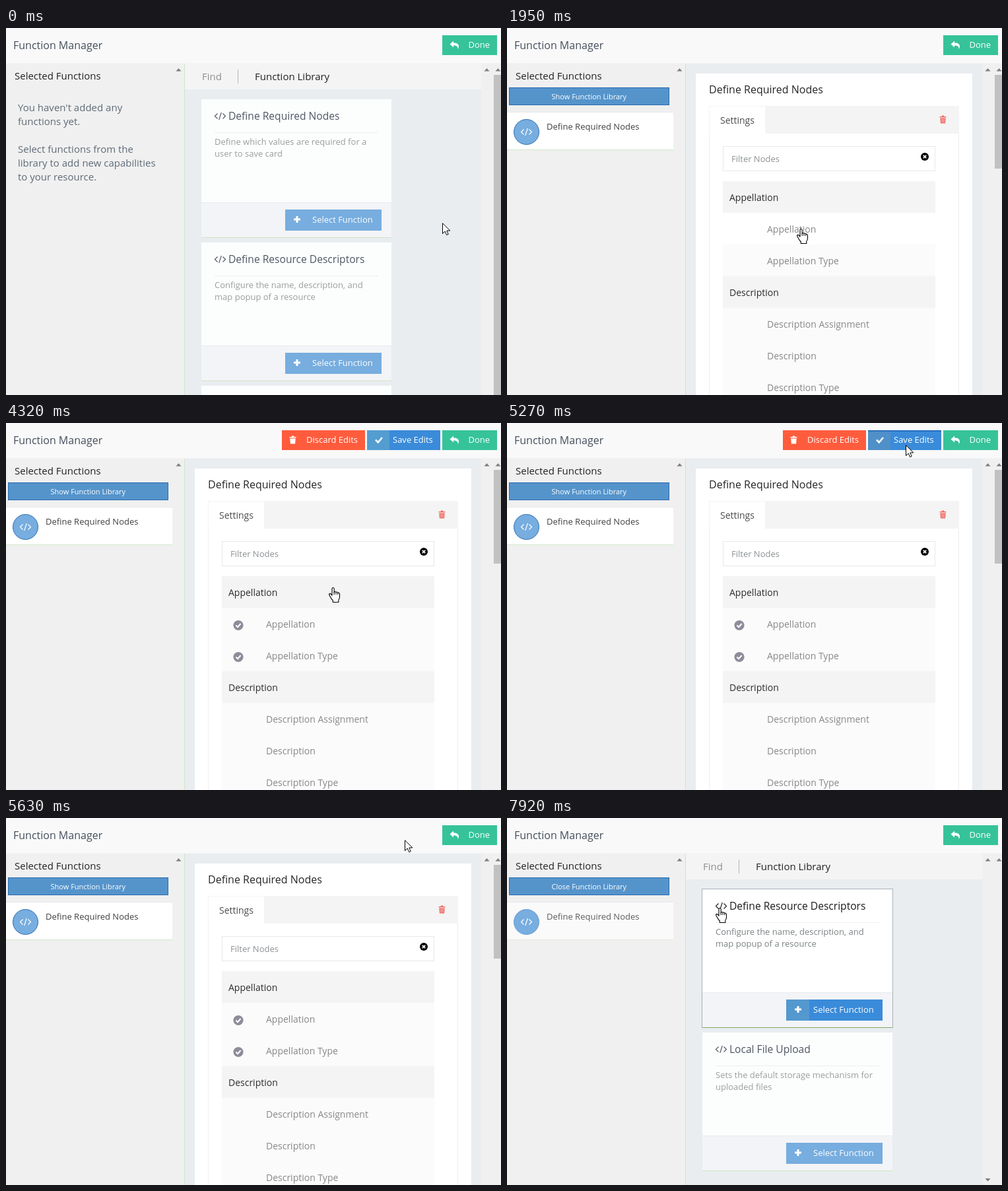
Recreate the animation shown at these times as an HTML page. Size 750x556 px, loop 8 s.

```html
<!DOCTYPE html>
<html lang="en">
<head>
<meta charset="utf-8">
<title>Function Manager</title>
<style>
  html, body { margin: 0; width: 100%; height: 100%; overflow: hidden; background: #f0f0f0; }
  svg { display: block; width: 750px; height: 556px; font-family: "Open Sans", sans-serif; }
</style>
</head>
<body>
<svg id="stage" viewBox="0 0 750 556"></svg>
<script>
const LOOP = 8000;
const stage = document.getElementById('stage');

const rect = (x, y, w, h, fill, extra = '') =>
  `<rect x="${x}" y="${y}" width="${w}" height="${h}" fill="${fill}" ${extra}/>`;
const frame = (x, y, w, h, fill, line) =>
  rect(x + .5, y + .5, w - 1, h - 1, fill, `stroke="${line}"`);
const text = (x, y, size, str, fill) =>
  `<text x="${x}" y="${y}" font-size="${size}" fill="${fill}">${str}</text>`;
const disc = (x, y, r, fill, extra = '') =>
  `<circle cx="${x}" cy="${y}" r="${r}" fill="${fill}" ${extra}/>`;
const path = (x, y, d, fill, line = 'none', width = 1) =>
  `<path transform="translate(${x} ${y})" d="${d}" fill="${fill}" stroke="${line}" stroke-width="${width}"/>`;

// Icons, drawn around their own centre
const code = (x, y, color, w = 1.3) =>
  path(x, y, 'M-4-4L-8 0L-4 4M4-4L8 0L4 4M1.8-5.5L-1.8 5.5', 'none', color, w);
const plus = (x, y) => path(x, y, 'M-5 0H5M0-5V5', 'none', '#fff', 3);
const tick = (x, y, s, w, color) =>
  path(x, y, `M${-s} 0L${-s / 4} ${s * .75}L${s} ${-s * .7}`, 'none', color, w);
const reply = (x, y, color) =>
  path(x, y, 'M-7-1L-1.5-6V-3C4-3 6.5-1 6.5 2.5Q6.5 4.5 5 6.5C5.5 2.5 3 1 -1.5 1V4Z', color);
const trash = (x, y, color) =>
  path(x, y, 'M-5-4.5H-2L-1.4-6H1.4L2-4.5H5V-3H-5ZM-4.2-2H4.2L3.6 6H-3.6Z', color) +
  path(x, y, 'M-1.8-.8V4.6M0-.8V4.6M1.8-.8V4.6', 'none', '#fff8', .8);
const arrowUp = (x, y) => path(x, y, 'M-4 2.5L0-2L4 2.5Z', '#7d7d7d');

const arrowCursor = (x, y) =>
  path(x, y, 'M.5 .8V16.5L4.2 13L6.7 18.6L9.2 17.5L6.8 12H11.8Z', '#fff', '#000');
const handCursor = (x, y) =>
  path(x - 6, y, 'M5 12.5V2.3Q5 .5 6.5 .5T8.2 2.3V7.2Q9.4 5.8 11 7.4Q12.6 6.4 13.8 8.2' +
    'Q16.5 7.8 16.5 10.6V14.5Q16.5 17 14.8 19V22.5H6.3V20Q4 17.6 2.6 14.8L.8 11.6' +
    'Q.2 9.6 2 9.4Q3.6 9.5 5 12.5Z', '#fff', '#000', 1.1) +
  path(x - 6, y, 'M8.2 7V11M11 7.6V11M13.8 8.4V11.2', 'none', '#000');

// Pointer moves: begin, end, number of steps, destination
const moves = [
  [230, 830, 9, 529, 294], [1740, 1950, 4, 445, 304], [2110, 2111, 1, 441, 310],
  [3030, 3470, 7, 441, 356], [4240, 4970, 11, 604, 33],
  [6490, 7150, 10, 208, 107], [7760, 7920, 3, 322, 136],
];
function pointer(t) {
  let x = 661, y = 295;
  for (const [a, b, n, tx, ty] of moves) {
    if (t < a) break;
    const p = Math.min(n, Math.floor((t - a) / (b - a) * (n - 1) + 1e-6) + 1) / n;
    const e = p * (2 - p);
    x += (tx - x) * e;
    y += (ty - y) * e;
  }
  return { x: Math.round(x), y: Math.round(y) };
}

function card(y, title, lines, hover, pressed) {
  let s = hover ? rect(295, y - 1, 290, 211, '#a9b0b7') : '';
  s += rect(296, y, 288, 210, hover ? '#fff' : '#fcfefd');
  s += code(324.5, y + 25.5, hover ? '#222' : '#555b66', 1.2);
  s += text(337, y + 31, 15.6, title, hover ? '#1c1c1c' : '#505664');
  s += rect(316, y + 50, 248, 1, '#eeefef');
  lines.forEach((l, i) => s += text(316, y + 69 + 18 * i, 13, l, hover ? '#7c8284' : '#999d9e'));
  s += rect(296, y + 156, 288, 53, '#f3f4f7') + rect(296, y + 156, 288, 1, '#e8eaeb');
  s += rect(296, y + 209, 288, 1, hover ? '#86a866' : '#cfe6c4');
  s += rect(423, y + 167, 146, 32, hover ? '#3a8bd9' : '#77addf');
  if (hover) s += rect(423, y + 167, 35, 32, '#5398cf');
  if (pressed) s += rect(423, y + 167, 146, 1.5, '#1863b3');
  return s + plus(441, y + 182) + text(464, y + 187, 13, 'Select Function', '#fff');
}

const cards = {
  nodes: ['Define Required Nodes', ['Define which values are required for a', 'user to save card']],
  names: ['Define Resource Descriptors', ['Configure the name, description, and', 'map popup of a resource']],
  files: ['Local File Upload', ['Sets the default storage mechanism for', 'uploaded files']],
};

function library(first, second, hover, pressed) {
  return rect(271, 54, 449, 502, '#e9edf0') + rect(271, 54, 449, 39, '#f4f4f4') +
    text(297, 79, 15, 'Find', '#8f8f8f') + rect(351, 63, 1, 21, '#b5b5b5') +
    text(377, 79, 15, 'Function Library', '#222') +
    card(108, ...first, hover, pressed) + card(325, ...second, false, false);
}

function settings(checks, hoverRow, grey) {
  let s = rect(271, 54, 449, 502, '#e9edf0') + rect(286, 69, 419, 487, '#fff') +
    text(306, 99, 16, 'Define Required Nodes', '#262626') +
    frame(306, 118, 379, 450, '#fff', '#eee') + rect(306, 118, 379, 42, '#f4f4f4') +
    rect(307, 119, 84, 41, '#fff') + text(323, 145, 14, 'Settings', '#4c4c4c') +
    trash(660.5, 138.5, grey ? '#e08aa8' : '#f07068') +
    frame(327, 179, 322, 38, '#fff', '#e9e9e9') + text(340, 203, 13, 'Filter Nodes', '#8b9093') +
    disc(633, 195, 6, grey ? '#40507a' : '#000') +
    path(633, 195, 'M-2.2-2.2L2.2 2.2M2.2-2.2L-2.2 2.2', 'none', '#fff', 1.8);
  const rows = ['Appellation', 'Appellation', 'Appellation Type', 'Description',
    'Description Assignment', 'Description', 'Description Type'];
  rows.forEach((label, i) => {
    const y = 232 + 48 * i, head = i % 3 == 0 && i < 6;
    s += rect(327, y, 322, 48, head ? '#f4f4f4' : i == hoverRow ? '#fff' : '#fbfbfb');
    s += text(head ? 337 : 394, y + 30, 14, label, head ? '#2c2c2c' : '#888');
    if (i > 0 && i <= checks)
      s += disc(352, y + 26.5, 7.6, grey ? '#b8b8cc' : '#8c8c9a') + tick(352, y + 26.5, 3.6, 2, '#fff');
  });
  return s;
}

function sidebar(added, label, hover, open, grey) {
  let s = rect(0, 54, 270, 502, '#f0f0f0') + rect(270, 54, 1, 502, '#cfe6c8') +
    arrowUp(261.5, 63) + text(13, 78, 15, 'Selected Functions', '#222');
  if (!added) {
    ["You haven't added any", 'functions yet.', '', 'Select functions from the',
      'library to add new capabilities', 'to your resource.'].forEach((l, i) =>
      s += text(18, 126 + 21 * i, 15, l, '#5f6b77'));
    return s;
  }
  const tone = grey ? '#d0d0ea' : '';
  s += frame(3, 90, 243, 27, hover ? '#1265b8' : tone || '#5594cb', hover ? '#1265b8' : grey ? '#8a96c4' : '#2a6bb0');
  s += text(67.5, 108, 11, label, '#fff');
  s += rect(0, 127, 252, 58, open ? '#fff' : '#fafafa') + rect(0, 127, 252, 1, '#e6e8e6') +
    rect(0, 184, 252, 1, open ? '#d3e6c9' : '#e3eadf');
  s += disc(29.5, 157.5, 19, tone || '#77addf', `stroke="${open ? '#2f6fb4' : '#6a9fd4'}"`);
  return s + code(29.5, 157.5, '#fff', 1.2) +
    text(60, 154, 13, 'Define Required Nodes', open ? '#3f3f3f' : '#5c5c5c');
}

function topButtons(editing, saveHover, grey) {
  const ink = grey ? '#e0e0e0' : '#fff';
  let s = rect(661, 11, 83, 30, grey ? '#43efb8' : '#36c399') +
    reply(679.5, 25.5, ink) + text(700.5, 30, 13, 'Done', ink);
  if (!editing) return s;
  s += rect(418, 11, 126, 30, grey ? '#c47a52' : '#ff5c3d') + trash(434.5, 25.5, ink) +
    text(455, 30, 13, 'Discard Edits', ink);
  s += rect(547, 11, 111, 30, grey ? '#9f9fb3' : '#3a8bd9');
  if (!grey) s += rect(547, 11, 34, 30, saveHover ? '#4f90c9' : '#539dd1');
  if (saveHover && !grey) s += rect(547, 11, 111, 1.5, '#1863b3');
  return s + tick(565, 25.5, 5, 2.6, ink) + text(586, 30, 13, 'Save Edits', ink);
}

function spinner(t) {
  const step = Math.floor((t - 5330) / 73.4);
  let s = '';
  for (let i = 0; i < 8; i++) {
    const a = (8 + (step - 3 + 1e-6 < -3 ? 0 : Math.min(step, 3) - 3) * 27 - i * 45) * Math.PI / 180;
    s += disc((349.3 + 51 * Math.cos(a)).toFixed(1), (295.3 + 51 * Math.sin(a)).toFixed(1),
      [16, 14, 11.3][i] || 9.2, '#8484a4', 'opacity=".85"');
  }
  return s;
}

function scene(t) {
  const { x, y } = pointer(t);
  const empty = t < 1200, last = t >= 7530, inLibrary = empty || last;
  const grey = t >= 5330 && t < 5630, editing = t >= 2570 && t < 5630;
  const onShow = t >= 5630 && x < 246 && y > 90;
  const row = t < 5000 && x > 327 && x < 649 ? Math.floor((y - 232) / 48) : -1;
  const saveHover = x > 547 && x < 658 && y < 41;

  let s = rect(0, 0, 750, 556, '#f0f0f0');
  s += sidebar(!empty, last ? 'Close Function Library' : 'Show Function Library', onShow, !last, grey);
  if (empty) s += library(cards.nodes, cards.names, x < 584, t >= 980) + rect(296, 542, 288, 14, '#fcfefd');
  else if (last) s += library(cards.names, cards.files, x > 295, false);
  else s += settings(t < 2570 ? 0 : t < 3780 ? 1 : 2, row, grey);

  s += arrowUp(728.5, 63) + arrowUp(745.5, 63);
  if (last) s += path(728.5, 548.5, 'M-4-2.5L0 2L4-2.5Z', '#7d7d7d');
  else s += rect(739, 71, 11, empty ? 485 : 142, grey ? '#d0d0e6' : '#c1c1c1');

  s += rect(0, 0, 750, 53, '#f9f9f9') + rect(0, 53, 750, 1, '#f3f3f3') +
    text(11, 32, 16, 'Function Manager', '#454f5c');
  if (grey) s += rect(0, 0, 750, 556, '#000', 'opacity=".25"') + spinner(t);
  s += topButtons(editing, saveHover, grey);

  const hand = empty ? x < 569 : t < 5300 ? y > 232 : last || onShow;
  return s + (hand ? handCursor(x, y) : arrowCursor(x, y));
}

let shown = '';
function draw(now) {
  const next = scene(now % LOOP);
  if (next !== shown) stage.innerHTML = shown = next;
  requestAnimationFrame(draw);
}
draw(performance.now());
</script>
</body>
</html>
```
